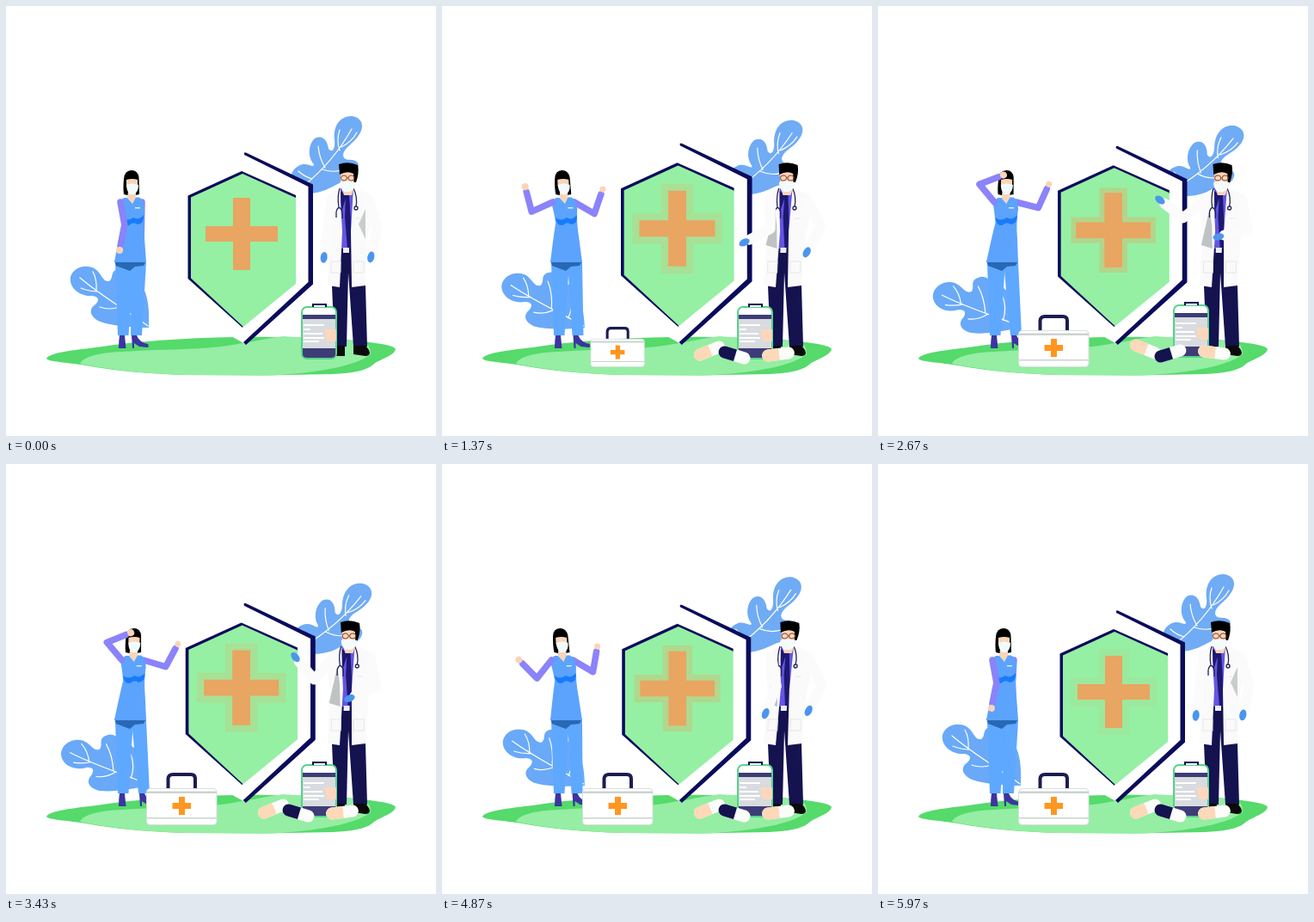
Animation, 500 px wide and 500 px high, one loop 6000 ms. Source, as an HTML page:

```html
<!DOCTYPE html>
<html lang="en">
<head>
<meta charset="utf-8">
<title>Medical team</title>
<style>
html, body { margin: 0; width: 100%; height: 100%; overflow: hidden; background: #fff; }
svg { display: block; width: 100vw; height: 100vh; }
.vein { fill: none; stroke: #fff; stroke-width: 1.2; stroke-linecap: round; }
.arm { fill: none; stroke-linejoin: round; stroke-linecap: round; }
.sleeve { stroke: #8a83fb; stroke-width: 7.5; }
.coat { stroke: #fbfbfb; stroke-width: 12; }
.skin { fill: #f9d5b8; }
.glove { fill: #4b95ee; }
.rim { fill: #0b0b5c; }
.tube { fill: none; stroke: #232452; stroke-width: 1.3; }
</style>
</head>
<body>
<svg viewBox="0 0 500 500">
  <defs>
    <path id="plus" d="M264 223h20v33h32v18h-32v33h-20v-33h-32v-18h32z"/>
  </defs>

  <g id="leafL">
    <path fill="#69a9f8" d="M166 374C150 374 120 372 107 366C97 360 96 352 104 347C109 342 108 338 100 337C86 338 73 328 75 315C79 302 95 300 104 306C112 312 112 321 120 320C126 316 120 307 132 306C144 304 146 320 152 322C160 322 168 340 166 374Z"/>
    <path class="vein" d="M165 372C140 354 112 338 86 316M105 331Q106 318 101 309M107 332Q97 332 87 328M130 348Q133 330 129 316M132 350Q120 354 109 350M148 361Q156 348 154 334"/>
  </g>
  <g id="leafR">
    <path fill="#70abf5" d="M335 217C330 200 330 192 340 186C350 180 358 190 358 184C350 175 352 160 359 154C369 149 374 158 375 166C380 172 383 165 382 156C380 140 388 128 402 128C416 130 417 142 409 152C404 160 392 165 392 174C394 182 403 176 409 182C413 190 402 202 390 205C378 210 365 222 335 217Z"/>
    <path class="vein" d="M345 210Q380 182 402 143M371 188Q364 176 363 163M388 168Q384 156 388 144M390 164Q402 158 408 147M368 190Q385 196 402 186M356 201Q346 198 340 192"/>
  </g>

  <path fill="#55da6b" d="M47 410C50 403 80 400 105 397C150 390 205 386 265 385C330 384 400 387 430 392C444 394 452 396 453 399C452 406 435 411 428 416C419 425 400 427 380 428L300 429.5L210 429Q140 427 93 418C70 414 50 414 47 410Z"/>
  <path fill="#95eea3" d="M86 416C90 407 110 403 135 402C180 399 215 400 250 396C280 392 300 387 322 384L415 390Q424 393 424 405Q400 424 310 429.5L210 429Q140 427 86 416Z"/>

  <g id="shield">
    <path fill="#fff" d="M277 172L356 209V322L278 393L262 384L204 324V212Z"/>
    <path class="rim" d="M277 170.5H279L357 207.500V323.5L279 394L276 391L351.5 321V210L277 173Z"/>
    <path class="rim" d="M274 192L337 220V223L275 374L211.500 317V220.5Z"/>
    <path fill="#95f0a3" d="M275 195L337 223V323L276 373L215 316.5V222.5Z"/>
    <use id="glow" href="#plus" fill="none" stroke="#e9a562"/>
    <use href="#plus" fill="#e9a562"/>
  </g>

  <g id="nurse">
    <path id="nArmR" class="arm sleeve"/><circle id="nHandR" class="skin" r="3.5"/>
    <path id="nLegR" fill="#5ea8ff"/>
    <path fill="#5ea8ff" d="M127 298H148L142.5 383H130Z"/>
    <path fill="#2868b4" d="M126 296H163L160 302L150 303L144 308L128 302Z"/>
    <path fill="#3b35a0" d="M132 383H138L139.5 398H131Q131 390 132 383Z"/>
    <path id="nShoe" fill="#3b35a0" d="M146 383H152Q155 391 165 393Q167 397 164 397L155 396L149 392V398H147Z"/>
    <g id="nTop">
      <path d="M137 219Q136 212 137 201Q138 191 146 191Q153 191 154.5 199L155 219L150 220H141Z"/>
      <path class="skin" d="M142 216H151V223L147 230L141 223Z"/>
      <path fill="#5ba3fd" d="M137 223H141L147 230L151 222.5H155Q161 226 161 236Q159 252 161 270L163 298H126Q131 270 135 252Q133 235 131 228Z"/>
      <path fill="#177bfb" d="M135 246Q141 251 148 246Q154 250 160 243Q161 253 153 254Q148 250 143 255Q136 256 135 246Z"/>
      <path fill="#dcecff" d="M150 234h6v1.5h-6z"/>
      <path class="skin" d="M140 202Q147 200 153 202V209H140Z"/>
      <path fill="#f1fbfd" d="M140 208Q147 205 154 208Q154 216 149 219H144Q140 215 140 208Z"/>
    </g>
    <path id="nArmL" class="arm sleeve"/><circle id="nHandL" class="skin" r="4"/>
  </g>

  <g id="doctor">
    <path fill="#14124f" d="M384 280H408L418 325L420 396H404L398 310L396 396H382L379 325Z"/>
    <path fill="#0b0b0b" d="M404 395H418Q423 400 423 404Q422 407 418 407L404 405ZM382 395H394V407H382Z"/>
    <g id="dTop">
      <path fill="#6555e2" d="M389 212H405L402 282H389Z"/>
      <path fill="#1d1871" d="M395 219H399L403 282H397L394 246ZM389 215L396 220L390 240Z"/>
      <path fill="#eceef8" d="M392 281h7v6h-7z"/>
      <path fill="#fafafa" d="M388 212L374 220Q370 226 376 262L374 325L388 327L391 262ZM404 211L425 220Q430 228 421 265L418 325L402 327L401 262Z"/>
      <path id="shadeL" fill="#bfc3c4" d="M384 236L375 278L388 282L387 255Z"/>
      <path id="shadeR" fill="#c9cccd" d="M418 236L410 254L418 271Z"/>
      <path fill="none" stroke="#e6e8e9" d="M378 297h11v13h-11zM404 297h12v13h-12zM407 247h7"/>
      <path class="tube" d="M388 212Q385 222 387 234M384 246V239Q387 230 391 239V247M404 212Q409 222 407 233"/>
      <circle class="tube" cx="407" cy="235" r="2"/>
      <path class="skin" d="M389 192H406V207L402 220H393L389 207Z"/>
      <path d="M388 196L387 184Q398 180 409 185Q411 194 407 205H404.5L404 195Q397 191 388 196Z"/>
      <path fill="#f5fbfc" d="M388 205Q397 202 406 205Q406 213 400 216H393Q388 212 388 205Z"/>
      <path fill="none" stroke="#8d4935" d="M389.5 200a3.5 3 0 1 0 7 0a3.5 3 0 1 0-7 0M398 200a3.5 3 0 1 0 7 0a3.5 3 0 1 0-7 0M396 200h2"/>
    </g>
    <path id="dArmL" class="arm coat"/><ellipse id="dHandL" class="glove" rx="6.5" ry="4"/>
    <path id="dArmR" class="arm coat"/><ellipse id="dHandR" class="glove" rx="6.5" ry="4"/>
  </g>

  <g id="board">
    <rect x="344" y="350" width="40" height="60" rx="6" fill="#fff" stroke="#54d38a" stroke-width="2"/>
    <path fill="#d8dbdf" d="M345 364h38v34h-38z"/>
    <path fill="#3d3c77" d="M345 359h38v5h-38zM345 398h38v7q0 4-5 4h-28q-5 0-5-4z"/>
    <path stroke="#fff" stroke-width="2" d="M346 371h24M346 376h8M346 381h22M346 386h24M346 390h18"/>
    <path fill="#fcd7bd" d="M370 376h14v14h-11z"/>
    <path fill="#14124f" d="M356 346h17v4h-17z"/>
    <path fill="#fff" d="M358 348h13v2h-13z"/>
  </g>

  <g id="pills"></g>

  <g id="kit">
    <path fill="none" stroke="#1b1c52" stroke-width="4" d="M188.5 378V366Q189 361 194 361H215Q220 361 220 366V378"/>
    <rect x="163.5" y="377.5" width="81.5" height="42" rx="4" fill="#fff" stroke="#d8dfdc"/>
    <path fill="#ccd3d0" d="M164 380.500h81v2.5h-81zM164 411h81v1.5h-81z"/>
    <path fill="#ff961f" d="M201 387h7v7h7v7h-7v7h-7v-7h-7.5v-7h7.5z"/>
  </g>
</svg>
<script>
const LOOP = 6000;
const $ = id => document.getElementById(id);
const set = (id, name, value) => $(id).setAttribute(name, value);
const smooth = x => (1 - Math.cos(Math.PI * Math.min(1, Math.max(0, x)))) / 2;
const growAt = (x, y, s) => `translate(${x} ${y})scale(${s})translate(${-x} ${-y})`;

// Eased blend through evenly spaced values, wrapping to the first.
function mix(vals, pos) {
  const i = Math.floor(pos);
  return vals[i] + (vals[(i + 1) % vals.length] - vals[i]) * smooth(pos - i);
}

// Seconds forward until mid, then the same way back.
const pace = (t, mid = 3000) => Math.max(0, mid - Math.abs(t - mid)) / 1000;

// angle and reach: hand seen from the shoulder, one value per second of pace
const arms = [
  { id: 'nArmL', x: 133, y: 228, bend: -1, upper: 27, fore: 30, angle: [91, 176, 285, 290], reach: [56, 38, 34, 33] },
  { id: 'nArmR', x: 158, y: 228, bend: 1, upper: 27, fore: 30, angle: [91, -30, -11, -34], reach: [57, 32, 46, 43] },
  { id: 'dArmL', x: 379, y: 226, bend: -1, upper: 33, fore: 34, mid: 2800, angle: [98, 96, 182, 180], reach: [67, 64, 43, 56] },
  { id: 'dArmR', x: 422, y: 226, bend: -1, upper: 34, fore: 34, angle: [88, 90, 93, 133], reach: [66, 61, 59, 48] }
];

// Two-bone arm: the elbow follows from the hand.
function drawArm({ id, x, y, bend, upper, fore, mid, angle, reach }, t, shift) {
  const p = pace(t, mid), r = mix(reach, p), a = mix(angle, p) * Math.PI / 180;
  const cos = (upper ** 2 + r ** 2 - fore ** 2) / (2 * upper * r);
  const b = a + bend * Math.acos(Math.min(1, cos));
  const sx = x + shift, ex = sx + upper * Math.cos(b), ey = y + upper * Math.sin(b);
  const hx = sx + r * Math.cos(a), hy = y + r * Math.sin(a);
  const turn = Math.atan2(hy - ey, hx - ex) * 180 / Math.PI;
  set(id, 'd', `M${sx} ${y}L${ex} ${ey}L${ex + (hx - ex) * 0.8} ${ey + (hy - ey) * 0.8}`);
  set(id.replace('Arm', 'Hand'), 'transform', `translate(${hx} ${hy})rotate(${turn})`);
}

// Skew the upper body so that the head moves by dx.
const lean = (id, dx, height, foot) =>
  set(id, 'transform', `matrix(1 0 ${-dx / height} 1 ${dx / height * foot} 0)`);

const pills = [
  { x: 311, y: 401, angle: -22, color: '#fdd8b9' },
  { x: 340, y: 406, angle: 17, color: '#14124f' },
  { x: 391, y: 405, angle: -7, color: '#fdd8b9' }
];
$('pills').innerHTML = pills.map(p =>
  `<g><rect x="-19" y="-7" width="38" height="14" rx="7" fill="#fcfcfa"/>
  <path fill="${p.color}" d="M1-7H-12a7 7 0 0 0 0 14H1z"/></g>`).join('');

function draw(t) {
  const sway = smooth(t / LOOP * 2);
  const back = t > LOOP / 2 ? smooth(2 - t / LOOP * 2) : sway;
  set('leafL', 'transform', `rotate(${-14 * back} 165 374)`);
  set('leafR', 'transform', `rotate(${9 * back} 335 220)`);

  const swell = mix([0, 1, 0.9, 0.6, 1, 0.6], t / 1000);
  set('shield', 'transform', growAt(284, 393, 1 + 0.05 * swell));
  const pulse = 1 - t % 2000 / 2000;
  set('glow', 'stroke-width', 16 * (1 - pulse ** 3));
  set('glow', 'opacity', 0.08 + 0.42 * pulse);

  const p = pace(t);
  const nurseLean = mix([0, -8, 0, 4], p), doctorLean = mix([0, 6, 0, 3], p);
  lean('nTop', nurseLean, 93, 298);
  lean('dTop', doctorLean, 130, 327);
  for (const arm of arms) drawArm(arm, t, 0.75 * (arm.id[0] === 'n' ? nurseLean : doctorLean));
  const step = 9 * mix([0, 0.6, 1, 1], p);
  set('nLegR', 'd', `M146 298H163L${158 + step} 383H${145 + step}Z`);
  set('nShoe', 'transform', `translate(${step})`);
  set('shadeL', 'opacity', smooth(p / 0.8));
  set('shadeR', 'opacity', 1 - smooth(p / 0.8));

  // Pills drop in, then rock once together with the board.
  const rock = smooth(1 - Math.abs(t - 2670) / 600);
  const settle = smooth((t - 500) / 700), pop = smooth((t - 400) / 350);
  pills.forEach(({ x, y, angle }, i) => $('pills').children[i].setAttribute('transform',
    `translate(${x} ${y - 12 * (1 - settle) - 2 * rock})rotate(${angle * (settle - 2 * rock)})scale(${pop})`));
  set('board', 'transform', `translate(0 ${-2 * rock})`);
  set('kit', 'transform', growAt(204, 419, smooth((t - 1100) / 400)));
}

const start = performance.now();
function tick() {
  draw((performance.now() - start) % LOOP);
  requestAnimationFrame(tick);
}
tick();
</script>
</body>
</html>
```
